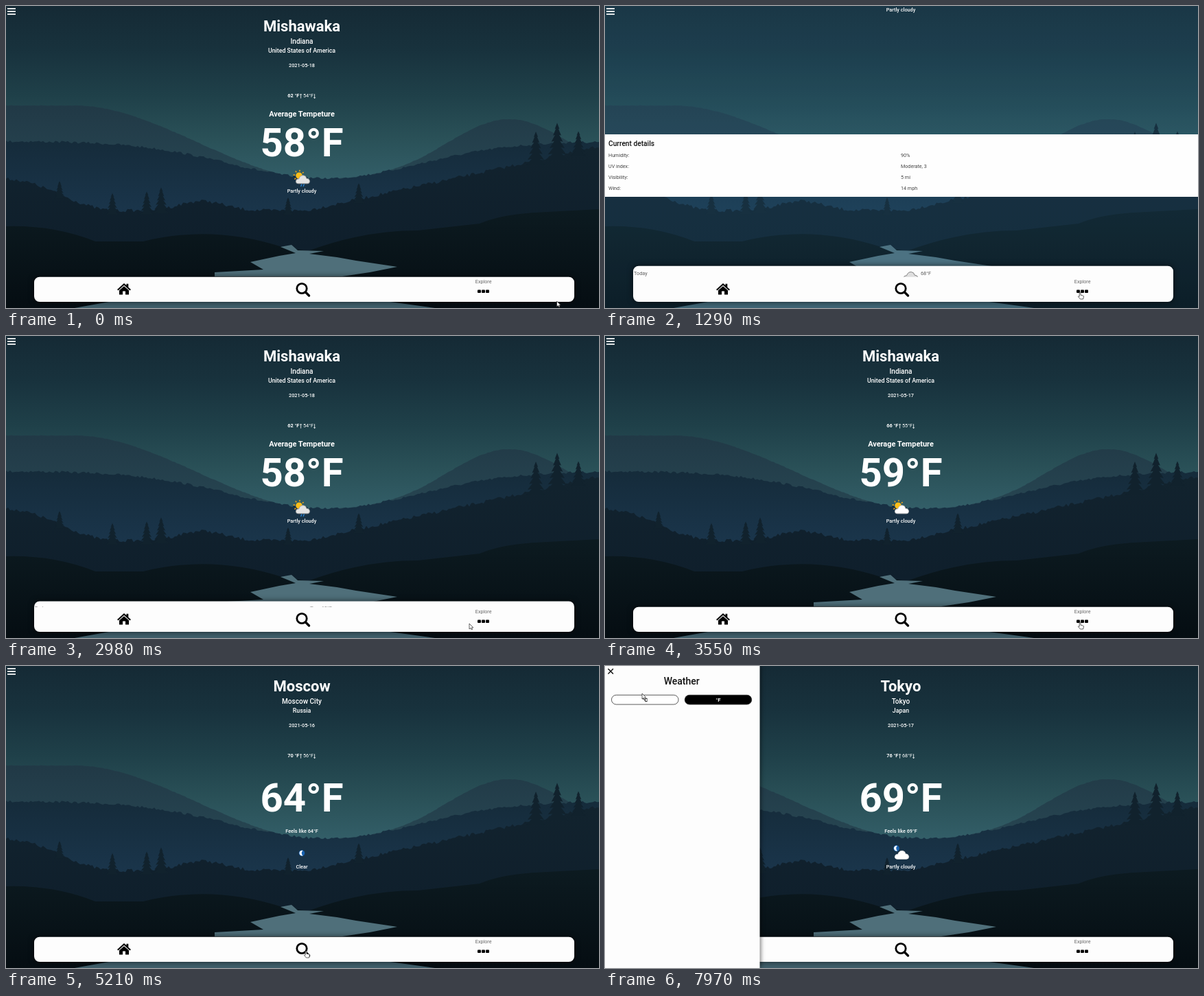
An HTML page that plays this animation: 864x440 px, repeating every 7990 ms.

```html
<!DOCTYPE html>
<html lang="en">
<head>
<meta charset="utf-8">
<title>Weather</title>
<style>
  html, body { margin: 0; width: 100%; height: 100%; overflow: hidden; background: #14262f; }
  #stage { display: block; width: 100vw; height: 100vh; }
  text { font-family: Roboto, Inter, "Liberation Sans", sans-serif; white-space: pre; }
  #card { filter: drop-shadow(0 0 4px rgba(0, 0, 0, .65)); }
  #menu > rect:first-child { filter: drop-shadow(1px 0 3px rgba(0, 0, 0, .6)); }
</style>
</head>
<body>
<svg id="stage" viewBox="0 0 864 440" preserveAspectRatio="none">
  <defs id="fills"></defs>
  <g id="scene"></g>
  <rect id="glow" width="864" height="440" fill="#3a86b0"/>
  <g id="page">
    <g id="hero" fill="#fff" transform="translate(0 -.9)"></g>
    <g id="details"></g>
  </g>
  <path d="M2 3.8h12M2 7.8h12M2 11.8h12" stroke="#fff" stroke-width="1.8"/>
  <rect id="card" x="41" width="787" rx="8" fill="#fdfdfd"/>
  <svg id="clip" x="41" width="787" overflow="hidden"><g id="rows"></g></svg>
  <g id="nav" transform="translate(0 -.5)"></g>
  <g id="search"></g>
  <g id="menu"></g>
  <g id="cursor" fill="#fff" stroke="#222" stroke-width=".7">
    <path id="arrow" d="M0 0V8L2 6.4L3.3 9L4.6 8.4L3.4 5.9H5.8Z"/>
    <path id="hand" d="M.2 1Q1.2-.4 2 1V4.2L5.6 5Q6.6 5.4 6.3 7L5.6 10H1.4L-1.6 6.4Q-1.4 5.2 .2 6.2Z"/>
  </g>
</svg>
<script>
const $ = id => document.getElementById(id);
const LOOP = 7990, W = 864;

// ---- helpers ----
const ease = u => (u = Math.min(1, Math.max(0, u)), u * u * (3 - 2 * u));
const bell = (x, mid, width) => Math.exp(-(((x - mid) / width) ** 2));
let seed = 7;
const rnd = () => (seed = seed * 16807 % 2147483647) / 2147483647;

const text = (x, y, size, str, { w = 400, a = 'start', f = 'inherit' } = {}) =>
  `<text x="${x}" y="${y}" font-size="${size}" font-weight="${w}" text-anchor="${a}" fill="${f}">${str}</text>`;
const centred = (y, size, str, w = 500) => text(431, y, size, str, { w, a: 'middle' });
const path = (d, fill, extra = '') => `<path d="${d}" fill="${fill}" ${extra}/>`;
const at = (x, y, inner, scale = 1) => `<g transform="translate(${x} ${y}) scale(${scale})">${inner}</g>`;
const fade = (id, y1, y2, ...colors) =>
  `<linearGradient id="${id}" gradientUnits="userSpaceOnUse" x1="0" x2="0" y1="${y1}" y2="${y2}">` +
  colors.map((c, i) => `<stop offset="${i / (colors.length - 1)}" stop-color="${c}"/>`).join('') + '</linearGradient>';

// ---- landscape ----
const farLine = x => Math.min(145 + 108 * ease((x - 100) / 360), 253 - 88 * bell(x, 733, 128));
const midLine = x => 197 + 54 * bell(x, 465, 195);
const woodLine = x => Math.min(252 + 46 * ease(x / 160) - 14 * bell(x, 285, 45), 304 - .218 * (x - 410));

function ridge(line, jag, fill) {
  let d = 'M0 440';
  for (let x = 0; x <= W; x += 3) d += `L${x} ${(line(x) + (rnd() - .5) * jag).toFixed(1)}`;
  return path(d + 'V440Z', fill);
}

function pine(x, h) {
  const base = woodLine(x) + 7, left = [], right = [];
  for (let i = 1; i <= 6; i++) {
    const w = h * .045 * i + 1, y = base - h + h * i / 6;
    right.push(`${x + w} ${y}`, `${x + w / 2} ${y - 1}`);
    left.unshift(`${x - w / 2} ${y - 1}`, `${x - w} ${y}`);
  }
  return path(`M${x} ${base - h}L${right.join('L')}L${left.join('L')}Z`, '#11222d');
}
const pines = [[78, 26], [155, 32], [205, 34], [226, 38], [411, 26], [514, 30], [772, 49], [803, 55], [834, 36]];

$('fills').innerHTML =
  fade('sky', 0, 260, '#152a35', '#18323d', '#1f4049', '#2a5158', '#34606a') +
  fade('far', 145, 250, '#213946', '#274652') +
  fade('mid', 195, 300, '#152b3a', '#1a354b') +
  fade('wood', 200, 350, '#12232e', '#0f1f2c') +
  fade('bank', 300, 440, '#0c1a20', '#050d12');

$('scene').innerHTML =
  '<rect width="864" height="260" fill="url(#sky)"/>' +
  ridge(farLine, .8, 'url(#far)') + ridge(midLine, 3.5, 'url(#mid)') + ridge(woodLine, 5, 'url(#wood)') +
  pines.map(p => pine(...p)).join('') +
  path('M0 321Q70 319 130 343H200Q300 318 402 351L440 357Q520 327 600 327L690 317Q720 304 770 301L864 296V440H0Z',
    'url(#bank)') +
  path('M400 351L416 348L425 356L463 357L442 361L482 366L510 371L570 380L530 388L490 394H304V388L375 384' +
    'L356 373L398 364L422 360Z', '#4f6f7a') +
  path('M100 440L150 431H560L625 440Z', '#41606c');

// ---- weather icons ----
const cloud = (fill, line) =>
  path('M-7 7Q-11 6.5-10.5 3Q-10-.5-6-.3Q-4-6 1-5.5Q5-5 5.5-1Q10-1 10.5 3Q10.5 7 7 7Z', fill,
    `stroke="${line}" stroke-width=".9"`);
const sun = at(-4, -2.5, '<circle r="4.7" fill="#fdbe18"/>' +
  '<circle r="7.2" fill="none" stroke="#f7a614" stroke-width="2.4" stroke-dasharray="1.4 4.255"/>');
const moon = '<circle r="4.3" fill="#1761b0"/>' + path('M1.5-3.6A3.8 3.8 0 1 0 1.5 3.6A4.5 4.5 0 0 1 1.5-3.6Z', '#fff');
const drops = '<path d="M0 10l-1.5 3.5M3.500 10l-1.5 3.5" stroke="#2a86d8" stroke-width="1.3"/>';
const icons = {
  overcast: cloud('#dedede', '#777'),
  partly: sun + at(1.5, 2.5, cloud('#fff', '#bbb'), .96),
  rain: sun + at(1.5, 2.5, cloud('#e4e4e4', '#999'), .96) + drops,
  clear: moon,
  night: at(-6.5, -7, moon) + at(1.5, 2, cloud('#fff', '#e4e4e4'), .96)
};

// ---- panel, bar and menu ----
const days = [
  { day: 'Today', sky: 'Overcast', ic: 'overcast', hi: 68, lo: 51 },
  { day: '2021-05-17', sky: 'Partly cloudy', ic: 'partly', hi: 66, lo: 55 },
  { day: '2021-05-18', sky: 'Patchy rain possible', ic: 'rain', hi: 62, lo: 54 }
];
$('rows').innerHTML = days.map((d, i) => {
  const pair = (x, a, b) => text(x, 2.5, 7.3, a) + text(x, 11.2, 7.3, b);
  return at(0, i * 42.5, pair(0, d.day, d.sky) + at(403.5, 4, icons[d.ic]) +
    pair(418, d.hi + '°F', d.lo + '°F') + '<path d="M0 25.5H778" stroke="#a8a8a8"/>');
}).join('');
$('rows').setAttribute('fill', '#5a5a5a');

$('nav').innerHTML =
  path('M162 413.5L172 404.5L175.5 407.6V405.3H178.3V410.2L182 413.500L180.5 415L172 407.2L163.5 415Z', '#000') +
  path('M165 414.8L172 408.8L179 414.8V421H174V416H170V421H165Z', '#000') +
  '<circle cx="431" cy="412" r="7.2" fill="none" stroke="#000" stroke-width="2.8"/>' +
  '<path d="M436.5 417.5l5 5" stroke="#000" stroke-width="3.4" stroke-linecap="round"/>' +
  text(695.7, 404.5, 7.2, 'Explore', { a: 'middle', f: '#666' }) +
  [687, 693, 699].map(x => `<rect x="${x}" y="414" width="5" height="4.6" rx="1"/>`).join('');

$('search').innerHTML =
  '<rect x="45.5" y="399.5" width="776" height="27" rx="13.5" fill="#fff" stroke="#ccc"/>' +
  '<text id="query" x="64" y="418.5" font-size="16" fill="#111"></text>' +
  '<rect id="caret" y="404" width="1" height="18"/>';

const pill = (x, label, fill, ink) =>
  `<rect x="${x}" y="42.3" width="97.5" height="13.7" rx="6.8" fill="${fill}" stroke="#333" stroke-width=".8"/>` +
  text(x + 48.8, 51.9, 7.8, label, { w: 700, a: 'middle', f: ink });
$('menu').innerHTML =
  '<rect width="225.5" height="440" fill="#fdfdfd"/>' +
  '<path d="M4.5 4l7.5 7.5M12 4L4.5 11.5" stroke="#000" stroke-width="1.3"/>' +
  text(111.7, 26.5, 14, 'Weather', { w: 500, a: 'middle', f: '#111' }) +
  pill(9.5, '°C', '#fff', '#000') + pill(116.2, '°F', '#000', '#fff');

// ---- weather states ----
const town = { place: ['Mishawaka', 'Indiana', 'United States of America'], avg: true, sky: 'Partly cloudy' };
const states = {
  wet: { ...town, date: '2021-05-18', hi: 62, lo: 54, now: 58, ic: 'rain', info: ['90%', 'Moderate, 3', '5 mi', '14 mph'] },
  dry: { ...town, date: '2021-05-17', hi: 66, lo: 55, now: 59, ic: 'partly', info: ['81%', 'Moderate, 5', '6 mi', '9 mph'] },
  moscow: { place: ['Moscow', 'Moscow City', 'Russia'], date: '2021-05-16', hi: 70, lo: 56, now: 64, ic: 'clear', sky: 'Clear' },
  tokyo: { place: ['Tokyo', 'Tokyo', 'Japan'], date: '2021-05-17', hi: 76, lo: 68, now: 69, ic: 'night', sky: 'Partly cloudy' }
};

let shown = '';
function show(key) {
  if (key === shown) return;
  shown = key;
  const s = states[key], [city, region, country] = s.place;
  $('hero').innerHTML =
    centred(38, 22, city, 700) + centred(55.5, 10, region) + centred(69.3, 8.8, country) + centred(89.7, 7.3, s.date) +
    text(410.3, 134, 7.3, s.hi + ' °F', { w: 700 }) + text(433, 134, 7.3, s.lo + '°F') +
    '<path d="M429.6 135.5v-6.5m-1.4 1.5l1.4-1.5l1.4 1.5M449.6 129v6.5m-1.4-1.5l1.4 1.5l1.4-1.5"' +
    ' fill="none" stroke="#fff" stroke-width=".8"/>' +
    (s.avg ? centred(162, 10.9, 'Average Tempeture', 700) : centred(243.8, 7.3, `Feels like ${s.now}°F`)) +
    centred(s.avg ? 220.2 : 213.2, 58, s.now + '°F', 700) +
    at(431, s.avg ? 250.5 : 273.5, icons[s.ic]) + centred(s.avg ? 272.9 : 295.6, 7.3, s.sky);
  const labels = ['Humidity:', 'UV index:', 'Visibility:', 'Wind:'];
  $('details').innerHTML = !s.info ? '' :
    '<rect y="451" width="864" height="91" fill="#fefefe"/>' +
    text(5, 467.5, 10.2, 'Current details', { w: 500, f: '#111' }) +
    labels.map((label, i) => at(0, 484.3 + i * 16,
      text(5, 0, 7.2, label, { f: '#444' }) + text(431, 0, 7.2, s.info[i], { f: '#444' }))).join('');
}

// ---- timeline ----
const last = (list, t) => list.findLast(e => e[0] <= t) || list[0];
// A switch that eases between 0 and 1 at each of the given times.
function flip(times, t, span) {
  const past = times.filter(s => s <= t), n = past.length;
  if (!n) return 0;
  const u = ease((t - past[n - 1]) / span);
  return n % 2 ? u : 1 - u;
}

const stateAt = [[0, 'wet'], [1700, 'dry'], [2240, 'wet'], [3250, 'dry'], [5190, 'moscow'], [7210, 'tokyo']];
const scrolls = [340, 2560];
const toggles = [1254, 2380, 2955, 3370, 3600, 4000];

const spots = { corner: [802.5, 430], page: [582, 288], dots: [691, 417], dry: [600, 318], rest: [588, 387],
  wet: [600, 362], aside: [675, 419], find: [436, 415], burger: [8, 8], unit: [54, 40] };
// Each row is an arrival time and a spot; the pointer sets off at most TRAVEL ms earlier.
const TRAVEL = 200;
const visits = [[0, 'corner'], [200, 'page'], [1200, 'dots'], [1660, 'dry'], [2130, 'rest'], [2220, 'wet'], [2370, 'dots'],
  [2980, 'aside'], [3220, 'dry'], [3365, 'dots'], [3830, 'dry'], [3990, 'dots'], [4300, 'find'],
  [7470, 'burger'], [7900, 'unit']];
function pointer(t) {
  const i = visits.findIndex(v => v[0] > t);
  if (i < 0) return spots.unit;
  const [t0, from] = visits[i - 1], [t1, to] = visits[i];
  const span = Math.min(TRAVEL, t1 - t0), u = ease((t - t1 + span) / span);
  return spots[from].map((v, k) => v + (spots[to][k] - v) * u);
}

const KEY = 128;
const searches = [
  { word: 'Moscow', open: 4310, first: 4390, done: 5190 },
  { word: 'Tokyo', open: 6170, first: 6370, done: 7210 }
];

const between = (v, a, b) => v >= a && v < b;
const toggle = (id, on) => $(id).style.display = on ? '' : 'none';
const move = (id, x, y) => $(id).setAttribute('transform', `translate(${x} ${y})`);

function draw(t) {
  show(last(stateAt, t)[1]);
  const scroll = flip(scrolls, t, 200), open = flip(toggles, t, 180), menu = flip([7540], t, 220);
  move('page', 0, -264 * scroll);
  $('glow').setAttribute('opacity', .14 * scroll);

  const top = 394.7 - 146 * open;
  $('card').setAttribute('y', top);
  $('card').setAttribute('height', 431 - top);
  $('clip').setAttribute('y', top);
  $('clip').setAttribute('height', 394.7 - top);
  toggle('clip', open > 0);
  move('rows', .5 + 4.5 * open, 9 + 12 * open);

  const job = searches.find(s => between(t, s.open, s.done));
  toggle('nav', !job);
  toggle('search', job);
  if (job) {
    const word = job.word.slice(0, Math.max(0, Math.floor((t - job.first) / KEY) + 1));
    $('query').textContent = word;
    $('caret').setAttribute('x', 64 + (word ? $('query').getComputedTextLength() : 0));
  }

  toggle('menu', menu > 0);
  move('menu', -230 * (1 - menu), 0);

  const [x, y] = pointer(t);
  const link = y > 400 && (between(x, 684, 708) || between(x, 422, 444)) || x < 14 && y < 14;
  move('cursor', x, y);
  toggle('cursor', !job);
  toggle('hand', link);
  toggle('arrow', !link);
}

const start = performance.now();
function tick(now) {
  draw(Math.max(0, now - start) % LOOP);
  requestAnimationFrame(tick);
}
draw(0);
requestAnimationFrame(tick);
</script>
</body>
</html>
```
